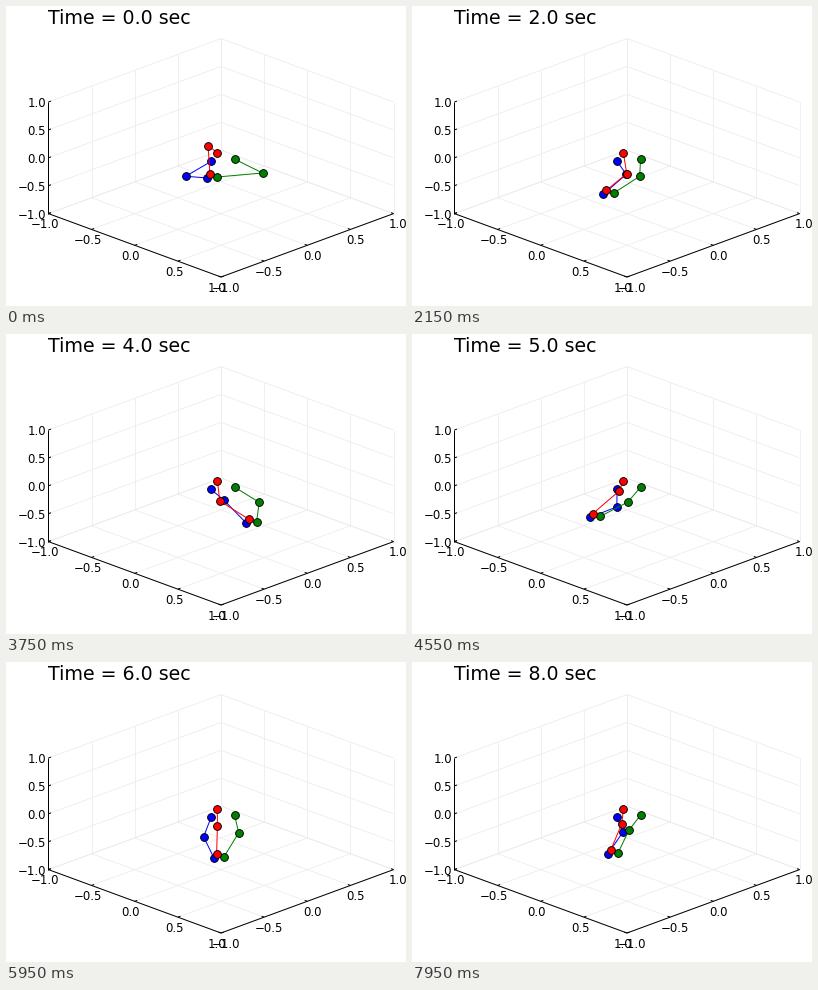
A matplotlib script for the animation above (8000 ms loop, 400 by 300 pixels).

```python
import numpy as np
import matplotlib.pyplot as plt
from matplotlib.animation import FuncAnimation

W, H, DPI = 400, 300, 100
FRAMES, STEP = 160, 50
PX = 72 / DPI
FONT = "DejaVu Sans"

# Delta robot: base radius, platform radius, upper and lower link
BASE, PLATE, UPPER, LOWER = 0.115, 0.05, 0.31, 0.412
HEADINGS = np.radians([-90, 30, 150])
DIRS = np.stack([np.cos(HEADINGS), np.sin(HEADINGS), 0 * HEADINGS], axis=1)
SIDE = np.array([-DIRS[1, 1], DIRS[1, 0], 0])
COLORS = ["#0000ff", "#008000", "#ff0000"]

# A pose is the blue, green and red shoulder angle, then the platform's
# offset along and across the green arm. The swing adds SWAY to it.
PERIOD, FLIP, FADE = 1.25, 1.2, 6.3
SWAY = np.array([18, -45, 18, 0.36, 0])
KEYS = {
    0.00: (18.5, 40, 18.5, -0.078, 0),
    1.30: (124.5, 60.6, 124.5, 0.07, 0),
    2.95: (97, 108, 98, -0.19, 0.04),
    4.55: (89, 108.5, 65.8, -0.288, 0.033),
    5.95: (73.8, 83.7, 90, 0.006, -0.086),
    6.90: (106.7, 92.4, 107.4, -0.117, 0.027),
    7.95: (102.2, 109, 81.2, -0.119, -0.005),
}


def swing(t):
    """Fading sway whose phase slips by half a turn after the release."""
    phase = 2 * np.pi * t / PERIOD + np.pi * np.exp(-(t / FLIP) ** 4)
    return SWAY * np.cos(phase) / (1 + (t / FADE) ** 3)


TIMES = np.array(list(KEYS))
DRIFT = np.array([KEYS[t] - swing(t) for t in KEYS])
SLOPES = np.gradient(DRIFT, TIMES, axis=0)
SLOPES[0] = 0


def pose_at(t):
    """Swing on top of a smooth drift through the key poses."""
    i = min(np.searchsorted(TIMES, t, side="right") - 1, len(TIMES) - 2)
    h = TIMES[i + 1] - TIMES[i]
    s = (t - TIMES[i]) / h
    a = s * s * (3 - 2 * s)
    drift = ((1 - a) * DRIFT[i] + a * DRIFT[i + 1]
             + h * s * (1 - s) ** 2 * SLOPES[i]
             - h * s * s * (1 - s) * SLOPES[i + 1])
    return drift + swing(t)


def project(x, y, z):
    return 215 + 86.3 * (x + y), 151.8 + 31.7 * (x - y) - 55.8 * z


def elbows(theta):
    pts = DIRS * (BASE + UPPER * np.cos(theta))[:, None]
    pts[:, 2] = -UPPER * np.sin(theta)
    return pts


def solve(t):
    """Shoulder angles and platform centre, relaxed to keep the links rigid."""
    pose = pose_at(t)
    theta = np.radians(pose[:3])
    plate = pose[3] * DIRS[1] + pose[4] * SIDE
    gap = plate - (elbows(theta) - PLATE * DIRS)
    reach = LOWER ** 2 - gap[:, 0] ** 2 - gap[:, 1] ** 2
    plate[2] = np.mean(-gap[:, 2] - np.sqrt(np.maximum(reach, 0.01)))
    for _ in range(8):
        gap = plate - (elbows(theta) - PLATE * DIRS)
        dist = np.linalg.norm(gap, axis=1)
        n = gap / dist[:, None]
        turn = -UPPER * np.sin(theta)[:, None] * DIRS
        turn[:, 2] = -UPPER * np.cos(theta)
        jac = np.hstack([np.diag(-np.sum(n * turn, axis=1)), n])
        fix = jac.T @ np.linalg.solve(jac @ jac.T + 0.02 * np.eye(3),
                                      dist - LOWER)
        theta = theta - fix[:3]
        plate = plate - fix[3:]
    return theta, plate


fig = plt.figure(figsize=(W / DPI, H / DPI), dpi=DPI, facecolor="white")
ax = fig.add_axes([0, 0, 1, 1])
ax.set_xlim(0, W)
ax.set_ylim(H, 0)
ax.axis("off")


def segment(a, b, color="black", width=1.0, z=2):
    (x0, y0), (x1, y1) = project(*a), project(*b)
    ax.plot([x0, x1], [y0, y1], color=color, lw=width * PX, zorder=z,
            solid_capstyle="butt")


def label(x, y, value, ha="center"):
    text = f"{value:.1f}".replace("-", "\u2212")
    ax.text(x, y, text, ha=ha, va="center", fontsize=8.5, family=FONT)


def draw_box():
    grid, tick = "#ececec", 0.03
    for v in np.linspace(-1, 1, 5):
        for a, b, c in [
            ((v, -1, -1), (v, 1, -1), (v, 1, 1)),
            ((1, v, -1), (-1, v, -1), (-1, v, 1)),
            ((-1, -1, v), (-1, 1, v), (1, 1, v)),
        ]:
            segment(a, b, grid, 0.8, 1)
            segment(b, c, grid, 0.8, 1)
        segment((v, -1, -1), (v, -1 + tick, -1))
        segment((1, v, -1), (1 - tick, v, -1))
        segment((-1, -1, v), (-1, -1 + tick, v))
        x, y = project(v, -1, -1)
        label(x - 3.7, y + 11, v)
        x, y = project(1, v, -1)
        label(x + 4.8, y + 11, v)
        x, y = project(-1, -1, v)
        label(x - 2.5, y + 1.5, v, "right")
    segment((-1, -1, -1), (1, -1, -1))
    segment((1, -1, -1), (1, 1, -1))
    segment((-1, -1, -1), (-1, -1, 1))


draw_box()
title = ax.text(41.8, 18, "", fontsize=13.7, family=FONT, va="baseline")
arms = [
    ax.plot([], [], "-o", color=c, lw=PX, ms=7.8 * PX, mec="black",
            mew=0.9 * PX, zorder=5 + k)[0]
    for k, c in enumerate(COLORS)
]


def update(frame):
    t = frame * STEP / 1000
    theta, plate = solve(t)
    joints = elbows(theta)
    for k, arm in enumerate(arms):
        chain = np.array([BASE * DIRS[k], joints[k], plate + PLATE * DIRS[k]])
        arm.set_data(*project(*chain.T))
    title.set_text(f"Time = {round(t):.1f} sec")
    return [*arms, title]


anim = FuncAnimation(fig, update, frames=FRAMES, interval=STEP,
                     repeat=True, repeat_delay=0, blit=False)
plt.show()
```
